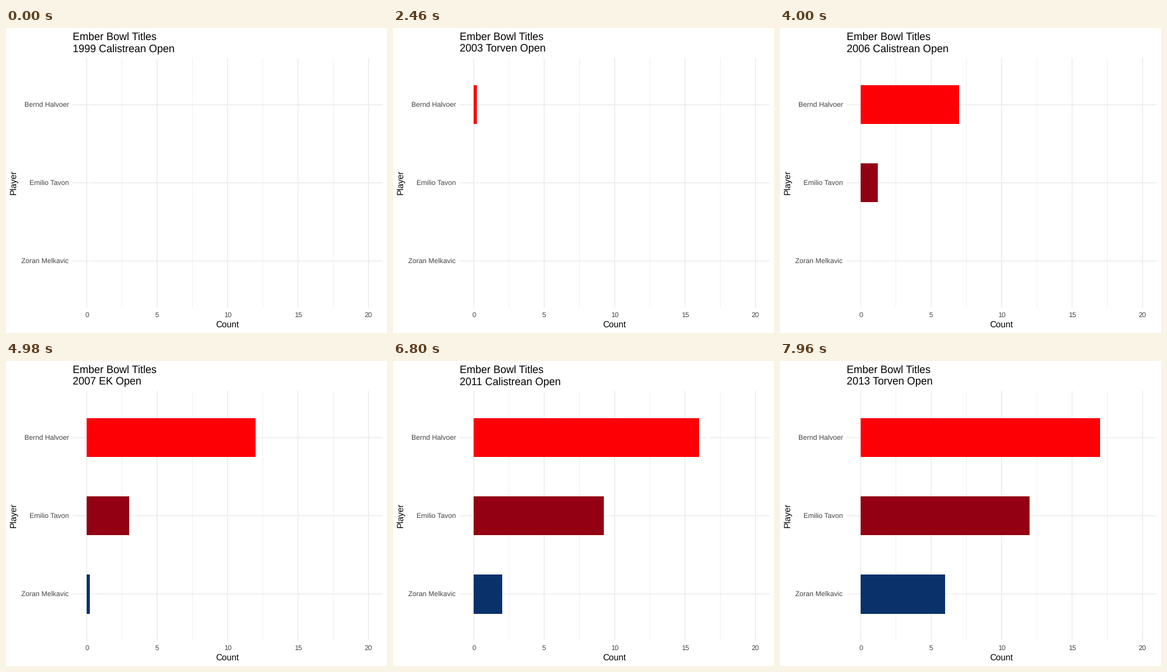
A matplotlib script for the animation above (8000 ms loop, 600 px wide and 480 px high).

```python
import matplotlib.pyplot as plt
from matplotlib.animation import FuncAnimation
from matplotlib.patches import Rectangle

WIDTH, HEIGHT, DPI = 600, 480, 100
FRAME_MS, FRAMES = 20, 400
LEAD_IN, STATE_FRAMES = 4, 7          # frames before the first state change, frames per state
EASE = (2 / 9, 7 / 9)                 # quadratic in-out at 1/3 and 2/3

PLAYERS = {
    "B": ("Bernd Halvoer", "#fd0006"),
    "E": ("Emilio Tavon", "#930013"),
    "Z": ("Zoran Melkavic", "#0b316a"),
}
EVENTS = ("Calistrean Open", "Torven Open", "Dunmorrow", "EK Open")
FIRST_YEAR = 1999
# Winner of each event, four per year; a dot is any other player.
WINNERS = "".join((
    ".... .... .... .... ..B. B.BB .EBB BEBB BEBB "
    "ZEEB EBB. BEEE ZEZZ ZEB. ZE").split())

LEFT, RIGHT, TOP, BOTTOM = 105, 593, 47, 440
UNIT = (RIGHT - LEFT) / 22
ROW_Y = (120.7, 243.6, 366.6)
BAR_SPANS = ((90, 151), (213, 274), (336, 398))
GRID = "#ebebeb"
AXIS_TEXT = "#434343"

plt.rcParams["font.family"] = "Liberation Sans"
plt.rcParams["text.hinting"] = "none"
plt.rcParams["toolbar"] = "None"

fig = plt.figure(figsize=(WIDTH / DPI, HEIGHT / DPI), dpi=DPI, facecolor="white")
ax = fig.add_axes((0, 0, 1, 1))
ax.set_xlim(0, WIDTH)
ax.set_ylim(HEIGHT, 0)
ax.axis("off")


def x_pos(count):
    return LEFT + UNIT * (count + 1)


def write(x, y, text, px, color="black", **kwargs):
    return ax.text(x, y, text, fontsize=px * 72 / DPI, color=color,
                   va="baseline", zorder=4, **kwargs)


def rule(xs, ys, px):
    ax.plot(xs, ys, color=GRID, lw=px * 72 / DPI, solid_capstyle="butt",
            snap=False, zorder=1)


def event_title(state):
    year, event = divmod(state, len(EVENTS))
    return f"{FIRST_YEAR + year} {EVENTS[event]}"


def total(key, state):
    return WINNERS[:state + 1].count(key)


for count in (2.5, 7.5, 12.5, 17.5):
    rule([x_pos(count)] * 2, [TOP, BOTTOM], 0.7)
for y in ROW_Y:
    rule([LEFT, RIGHT], [y, y], 1.4)
for count in range(0, 21, 5):
    rule([x_pos(count)] * 2, [TOP, BOTTOM], 1.4)
    write(x_pos(count), 455, str(count), 11, AXIS_TEXT, ha="center")

write(LEFT, 19, "Ember Bowl Titles", 16.5)
subtitle = write(LEFT, 37, "", 16.5)
write((LEFT + RIGHT) / 2, 471, "Count", 13.75, ha="center")
write(16, (TOP + BOTTOM) / 2 - 1, "Player", 13.75, ha="center",
      rotation=90, rotation_mode="anchor")

bars, counts = {}, {}
for (key, (name, color)), y, (top, bottom) in zip(PLAYERS.items(), ROW_Y, BAR_SPANS):
    write(99, y + 4.3, name, 11, AXIS_TEXT, ha="right")
    bars[key] = ax.add_patch(Rectangle((127, top), 0, bottom - top,
                                       facecolor=color, lw=0, zorder=3))
    counts[key] = write(0, y + 4.9, "", 13.8, "white")


def update(frame):
    step, phase = divmod(frame - LEAD_IN, STATE_FRAMES)
    state = step + 1
    progress = EASE[phase] if phase < len(EASE) else 1
    winner = WINNERS[state]
    # The text switches halfway through a move, or at once if no bar moves.
    shown = state if winner == "." or progress > 0.5 else state - 1
    subtitle.set_text(event_title(shown))

    for key, bar in bars.items():
        value = total(key, state)
        if key == winner:
            value += progress - 1
        end = x_pos(value)
        bar.set_width(round(end) - 127)
        label = str(total(key, shown))
        counts[key].set_text(label)
        counts[key].set_x(end + 1.53 * len(label))
    return [subtitle, *bars.values(), *counts.values()]


animation = FuncAnimation(fig, update, frames=FRAMES, interval=FRAME_MS,
                          repeat=True, repeat_delay=0, blit=False)
plt.show()
```
